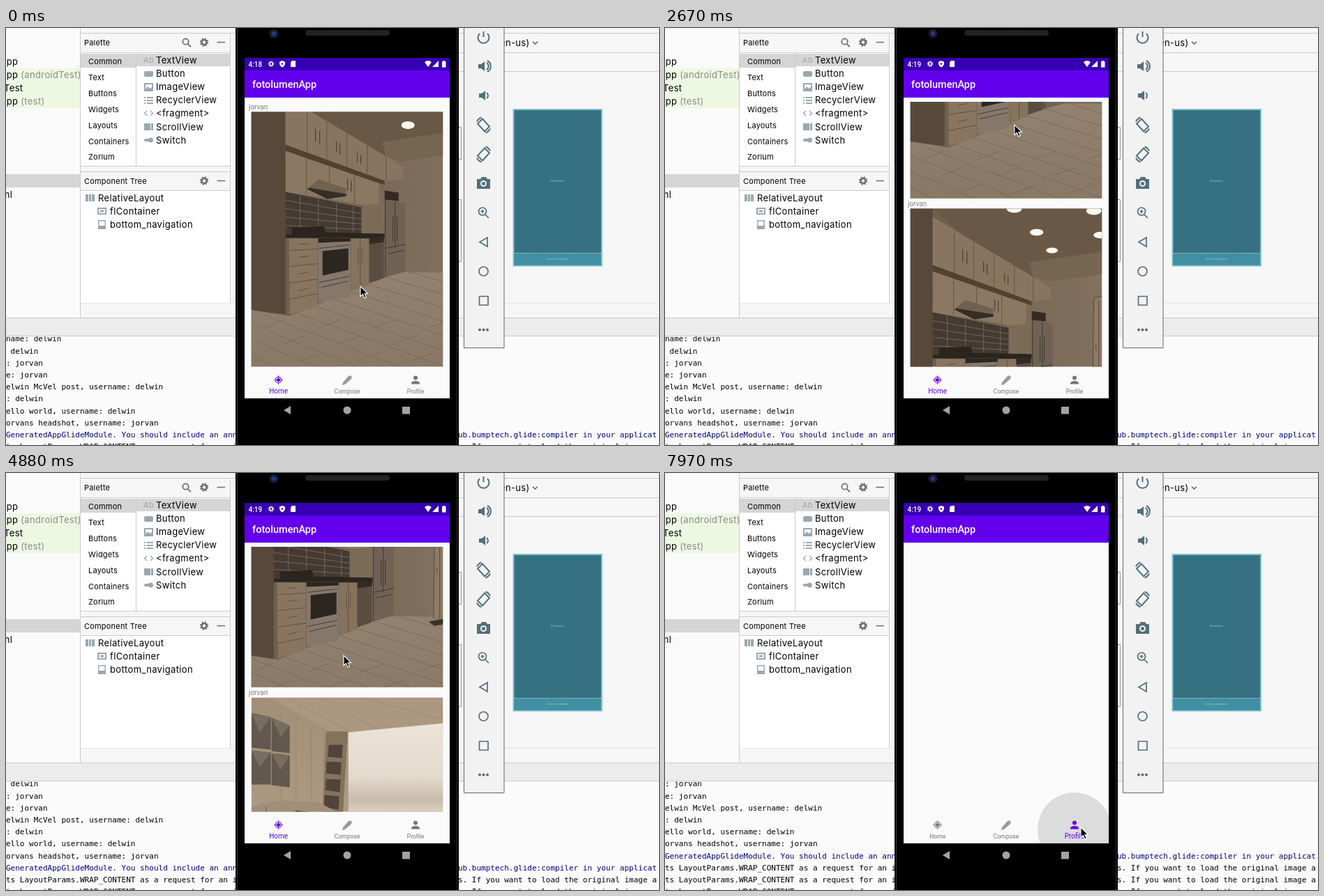
An HTML page for the animation above (8 s loop, 936 px wide and 599 px high).

```html
<!DOCTYPE html>
<html lang="en">
<head>
<meta charset="utf-8">
<title>Phone emulator scroll</title>
<style>
html, body { margin: 0; width: 100%; height: 100%; overflow: hidden; background: #f6f6f6 }
svg { display: block; width: 100vw; height: 100vh }
text { font: 13px Inter, sans-serif; letter-spacing: .35px; white-space: pre }
.small { font-size: 11px; letter-spacing: .2px }
.log { font: 11px "DejaVu Sans Mono", monospace; letter-spacing: 0 }
.tiny { font-size: 3.6px; letter-spacing: 0; fill: #a5cbd5; text-anchor: middle }
#phone text { font-family: Roboto, sans-serif; letter-spacing: 0 }
.name { font-size: 10px; fill: #808080 }
.tab { fill: #757575; color: #757575 }
.tab.on { fill: #6200ee; color: #6200ee }
.tab text { font-size: 8.6px; text-anchor: middle }
.tab.on text { font-size: 10px }
.line { fill: none; stroke: currentColor }
</style>
</head>
<body>
<svg viewBox="0 0 936 599" preserveAspectRatio="none">
<defs>
  <clipPath id="photoClip"><path d="M0 0h274.500v366H0z"/></clipPath>
  <clipPath id="listClip"><path d="M342 106h294v380.500H342z"/></clipPath>
  <clipPath id="screenClip"><path d="M342 43h294v489H342z"/></clipPath>
  <clipPath id="logClip"><path d="M0 443h936v156H0z"/></clipPath>
  <linearGradient id="sky" x2="0" y2="1">
    <stop stop-color="#ebe3d8"/><stop offset=".5" stop-color="#e4dacd"/>
    <stop offset=".72" stop-color="#c9bcad"/><stop offset=".82" stop-color="#d8cdbf"/><stop offset="1" stop-color="#b3a595"/>
  </linearGradient>
  <linearGradient id="wall"><stop stop-color="#6a5a48"/><stop offset="1" stop-color="#857461"/></linearGradient>
  <linearGradient id="floor" x2="0" y2="1"><stop stop-color="#938270"/><stop offset="1" stop-color="#857461"/></linearGradient>
  <linearGradient id="plaster" x2="0" y2="1"><stop stop-color="#a38f78"/><stop offset="1" stop-color="#b8a58d"/></linearGradient>
  <linearGradient id="sofa" x2="0" y2="1"><stop stop-color="#948270"/><stop offset="1" stop-color="#69594a"/></linearGradient>

  <g id="kitchen">
    <path fill="url(#wall)" d="M-20-60H330V420H-20z"/>
    <path fill="#695845" d="M20-60H330V25L188 44 193 64 86 0z"/>
    <path fill="#766551" d="M188 43 330 22V55L215 71 193 64z"/>
    <path fill="url(#floor)" d="M0 285 55 293 193 236 220 230 330 232V420H-20V284z"/>
    <g id="planks" class="line" color="#746351" stroke-width=".7"/>
    <path fill="#58483a" d="M-20-60H49V291L0 284-20 280z"/>
    <path fill="#87755f" d="M49-22 193 64 218 80V95L191 101 49 49z"/>
    <path fill="#51422f" d="M49 47 191 99V105L49 57z"/>
    <path fill="#8a7862" d="M49 56 183 103V137L49 115z"/>
    <path fill="#443a31" d="M49 115 158 137V175L49 176z"/>
    <path fill="#7b6a56" d="M158 135 191 130V177H158z"/>
    <path class="line" color="#87796a" stroke-width=".7" d="M49 127 158 146M49 139 158 154M49 151 158 161M49 163 158 169M70 120V173M96 126V173M122 131V173M146 136V173"/>
    <path class="line" color="#5c4d3b" stroke-width=".8" d="M80-3V59M108 13V69M137 30V80M166 47V91M193 64V101M79 67V119M112 78V125M148 91V131"/>
    <path class="line" color="#3f342a" d="M92 24V43M98 27V46M122 42V58M127 45V61M152 59V72M157 62V75M138 96V113M143 98V115"/>
    <path fill="#70624f" d="M80 111 96 97 136 110V121L109 125z"/>
    <path fill="#352d26" d="M80 111 83 109 136 118V121L109 125z"/>
    <path fill="#2b251f" d="M58 166 104 164 106 173 191 175V182L49 181V176H58z"/>
    <path fill="#887560" d="M54 182H95V279L55 291z"/>
    <path class="line" color="#5a4b3b" stroke-width=".9" d="M55 199 95 197M55 222 95 218M55 246 95 240M55 269 95 261M68 190 82 189M68 209 82 207M68 233 82 230M68 257 82 253"/>
    <path fill="#85786a" d="M96 181H142V265L96 274z"/>
    <path fill="#2c2621" d="M96 181H142V186L96 188zM102 200 139 196V227L102 235z"/>
    <path class="line" color="#463c32" d="M97 196 141 191M97 245 141 236M100 252 139 243"/>
    <path fill="#85735d" d="M143 182H168V249L143 258z"/>
    <path class="line" color="#5a4b3b" stroke-width=".8" d="M156 182V253M153 197V220M159 196V219"/>
    <path fill="#594d41" d="M169 182 190 180V239L169 246z"/>
    <path fill="#342a22" d="M169 182 190 180V187L169 190zM191 113 211 116V128L191 126z"/>
    <path fill="#6f6254" d="M191 126 221 131V229L191 238z"/>
    <path class="line" color="#40362d" d="M206 128V196M192 196 221 190M192 126V238M203 150V186M209 150V186M196 204 218 199"/>
  </g>
  <g id="photo0" clip-path="url(#photoClip)">
    <use href="#kitchen"/>
    <ellipse cx="224.500" cy="19" rx="9.500" ry="5.500" fill="#fffaf0"/>
  </g>
  <g id="photo1" clip-path="url(#photoClip)">
    <use href="#kitchen" x="-17" y="34"/>
    <path fill="#8c7b66" d="M263 128 275 126V273L261 268z"/>
    <path class="line" color="#5a4936" d="M261 268 263 128 275 126M270 132V268M266 195V203"/>
    <path fill="#393027" d="M254 272 275 268V276L262 278z"/>
    <g id="lamps" fill="#fffaf0"/>
  </g>
  <g id="photo2" clip-path="url(#photoClip)">
    <path fill="url(#plaster)" d="M0 0H275V366H0z"/>
    <path fill="#ac9880" d="M25 0H275V38L137 50 110 46z"/>
    <path class="line" color="#927f69" stroke-width=".6" d="M50 0 137 46M100 0 180 45M160 0 275 32M42 25V145M64 26V148M86 39V150M104 47V155"/>
    <path fill="url(#sky)" d="M139 50 275 37V189L139 176z"/>
    <path fill="#ded3c2" d="M139 173 275 185V196L139 182z"/>
    <path fill="#85725c" d="M107 49H138L131 172 102 166z"/>
    <path fill="#51443a" d="M111 68H131L130 87 109 85zM108 92 129 93 128 111 107 109zM107 117 128 118 127 136 106 133zM105 140 126 142 125 161 104 158z"/>
    <path fill="#bfae98" d="M150 197 275 203V366H50V290z"/>
    <path class="line" color="#99876f" stroke-width=".8" d="M155 212 275 219M145 239 182 231M110 270 166 253M95 299 155 279M76 329 137 311M195 200 178 229M230 202 218 232M154 238 65 365M175 221 102 365"/>
    <path fill="#5c4c3f" d="M181 228 275 238V366H115z"/>
    <path class="line" color="#8c7964" stroke-width="4" opacity=".5" d="M175 246 275 256M164 266 275 277M151 290 275 305M137 320 250 335"/>
    <path fill="#62584d" d="M0 22 28 28V75L0 72zM29 29 55 40V80L29 77zM0 76 28 79V125H0zM29 80 55 83V129L29 126z"/>
    <path fill="#776d60" d="M0 22 28 28 12 50zM29 29 55 40 42 57zM0 76 28 79 12 100zM29 80 55 83 42 104z"/>
    <path fill="#a18e79" d="M0 158 18 152 42 148 95 150 130 168 155 178V200H0z"/>
    <path fill="#a59380" d="M0 222 80 190 130 186 155 178V200L50 268 0 262z"/>
    <path fill="url(#sofa)" d="M0 258 50 268 155 197V230L53 310V366H0z"/>
    <path class="line" color="#6b5a49" d="M0 258 50 268 155 197M0 282 48 292 155 214M21 157V187M0 222 80 190"/>
    <path fill="#5b493a" d="M63 162 96 166 92 195 64 188z"/>
    <path fill="#403935" d="M98 166 127 168 125 193 98 192z"/>
    <path fill="#806f5c" d="M26 188 69 178 78 193 38 206zM0 186 28 181 36 208 0 229z"/>
  </g>

  <g id="gear" class="line" color="#6e6e6e">
    <circle r="3.500" stroke-width="2.600"/><circle r="5.300" stroke-width="1.800" stroke-dasharray="2.100 2.060"/>
  </g>
  <path id="speaker" d="M-8-3H-4L1-7V7L-4 3H-8z"/>
  <path id="turn" class="line" stroke-width="1.900" d="M-8.500-2-1.500-9 8.500 2 1.500 9zM-9.500-5A11 11 0 0 1-3-11M9.500 5A11 11 0 0 1 3 11"/>
</defs>

<!-- IDE window -->
<path fill="#f6f6f6" d="M0 0H936V599H0z"/>
<path fill="#fafafa" d="M0 0H106V416H0z"/>
<path fill="#edf8e3" d="M0 58H106V115H0z"/>
<path fill="#d5d5d5" d="M0 210H106V229H0z"/>
<path fill="#fff" d="M107 36H321V198H107zM107 234H321V395H107z"/>
<path fill="#d5d5d5" d="M107 37H186V57H107zM187 37H321V55H187z"/>
<path fill="#ececec" d="M0 417H936V443H0z"/>
<path fill="#fbfbfb" d="M0 443H936V599H0z"/>
<path class="line" color="#cbcbcb" d="M106.500 0V416M107 7.500H330M649 7.500H936M107 35.500H321M649 35.500H936M649 62.500H936M186.500 36V198M321.500 7V395M107 198.500H321M107 206.500H321M107 233.500H321M0 416.500H936M0 442.500H936"/>
<path class="line" color="#e6e6e6" d="M107 395.500H330M714 395.500H936"/>
<g id="ide" fill="#000"></g>
<g class="line" color="#6e6e6e" stroke-width="1.700">
  <circle cx="257.500" cy="19.500" r="4.200"/><path d="M260.500 23 265 27M302.500 20.500H314M302.500 219.500H314M755 19.500 758.500 23 762 19.500"/>
</g>
<use href="#gear" x="284" y="20.500"/><use href="#gear" x="284" y="219.500"/>
<g fill="#9aa7b0">
  <rect x="198" y="62" width="13" height="8" rx="2"/>
  <path fill-rule="evenodd" d="M198 79H211V91H198zM200 81V88L203 84 206 87 208 85 209 87V81z"/>
  <path d="M198 99H200V101H198zM202 99H211V101H202zM198 103H200V105H198zM202 103H211V105H202zM198 107H200V109H198zM202 107H211V109H202z"/>
  <path d="M198 137H207V147H198zM208 137H211V147H208z"/>
  <circle cx="207.500" cy="161" r="3.500"/><rect x="198" y="159" width="8" height="4" rx="2"/>
  <path d="M114 239H118V249H114zM119 239H122V249H119zM123 239H127V249H123z"/>
  <path fill-rule="evenodd" d="M131 258H144V268H131zM133 260V266H142V260zM135 261.500H140V264.500H135zM132 276H143V289H132zM133.500 277.500V284H141.500V277.500z"/>
</g>
<path class="line" color="#9aa7b0" stroke-width="1.400" d="M202 119 198.500 122.500 202 126M207 119 210.500 122.500 207 126"/>

<g clip-path="url(#logClip)"><g id="log"></g></g>

<!-- Blueprint preview -->
<path fill="#367182" stroke="#84c4d2" stroke-width="2" d="M727.500 117H854V341.500H727.500z"/>
<path fill="#418fa3" d="M728.500 324H853V340.500H728.500z"/>
<path class="line" color="#9ad0dc" stroke-dasharray="2 1" d="M728 323.500H853"/>
<text class="tiny" x="790.500" y="221">flContainer</text>
<text class="tiny" x="790.500" y="333">bottom_navigation</text>

<!-- Emulator toolbar -->
<path class="line" color="#999" d="M649 142.500H652.500V188.500H649M649 246.500H652.500V335.500H649"/>
<path fill="#f2f2f2" stroke="#666" d="M656.500-1H714V459.500H656.500z"/>
<g fill="#546e7c" color="#546e7c">
  <g class="line" stroke-width="2">
    <path d="M684.500 5V13M679 8A8 8 0 1 0 690 8M689 50A6 6 0 0 1 689 60M690 47A9 9 0 0 1 690 63M689 93A5 5 0 0 1 689 101"/>
    <g stroke-width="1.700"><circle cx="683" cy="263.500" r="5.500"/><path d="M687 268 692 273M680.500 263.500H685.500M683 261V266M690 301V314L679 307.500z"/>
    <circle cx="684.500" cy="349.500" r="6.500"/><path d="M678.500 385.500H691V398H678.500z"/></g>
  </g>
  <use href="#speaker" x="685" y="55"/><use href="#speaker" x="686" y="97"/>
  <use href="#turn" x="684.500" y="139.500"/><use href="#turn" transform="translate(684.500 181.500) scale(-1 1)"/>
  <path d="M675 217H680L682 214H688L690 217H694V231H675z"/><circle cx="684.500" cy="223.500" r="4.500" fill="#f2f2f2"/><circle cx="684.500" cy="223.500" r="2.500"/>
  <circle cx="679" cy="433.500" r="2"/><circle cx="684.500" cy="433.500" r="2"/><circle cx="690" cy="433.500" r="2"/>
</g>

<!-- Phone -->
<g id="phone">
  <path d="M329 0H649V599H329z"/>
  <path class="line" color="#333" d="M331.500 0V599M646.500 0V599"/>
  <circle cx="384" cy="8" r="6.500" fill="#1b1c2c"/><circle cx="384" cy="8" r="3" fill="#29398c"/>
  <rect x="429" y="3" width="121" height="8" rx="4" fill="#202020"/>
  <path class="line" color="#363636" stroke-dasharray="1 2" d="M432 5.500H547M432 8.500H547"/>
  <path fill="#fafafa" d="M342 100H636V532H342z"/>
  <path fill="#3700b3" d="M342 43H636V61H342z"/><path fill="#6200ee" d="M342 61H636V100H342z"/>
  <g fill="#fff" color="#fff">
    <text id="clock" x="347.500" y="55.500" style="font-size:10px;font-weight:500"></text>
    <text x="353" y="86" style="font-size:14.500px;font-weight:500">fotolumenApp</text>
    <g class="line"><circle cx="380" cy="51.500" r="2.300" stroke-width="1.600"/><circle cx="380" cy="51.500" r="4" stroke-dasharray="1.600 1.540"/></g>
    <path d="M396 47 400 48.500V52Q399 55 396 56.500 393 55 392 52V48.500zM410 47H415V56H408V49.500zM600 49Q605 45 610 49L605 56zM620 47V56H611zM625 48H626.500V47H629V48H630.500V56.500H625z"/>
    <circle cx="396" cy="51.500" r="1.300" fill="#3700b3"/>
  </g>
  <g clip-path="url(#listClip)"><g id="list"></g></g>
  <g clip-path="url(#screenClip)"><circle id="ripple" cx="587" cy="512" fill="#dcdcdc"/></g>
  <g id="home" class="tab">
    <g class="line" opacity=".75"><circle cx="390.500" cy="505.500" r="4.300" stroke-width="1.500"/><path d="M390.500 499V512M384 505.500H397"/></g>
    <circle cx="390.500" cy="505.500" r="2.500"/><text x="390.700" y="524.800">Home</text>
  </g>
  <g class="tab"><path fill="#9a9a9a" d="M482 513 483 509 491 500 493.500 499 496 501.500 495 504 486 512z"/><text x="489" y="524.800">Compose</text></g>
  <g id="profile" class="tab"><circle cx="587" cy="502.500" r="3"/><path d="M581 511.500V510Q582 507 587 507T593 510V511.500z"/><text x="587" y="524.800">Profile</text></g>
  <g fill="#a3a3a3"><path d="M408 543V555L398 549z"/><circle cx="489" cy="549" r="5.500"/><path d="M568 544H579V554.500H568z"/></g>
</g>
<path id="cursor" stroke="#fff" stroke-width="1.100" d="M0 0V14.500L3.400 11.500 5.700 16.800 8.300 15.700 6 10.500H10.500z"/>
</svg>

<script>
const $ = id => document.getElementById(id);
const text = (x, y, str, attrs = '') => `<text x="${x}" y="${y}" ${attrs}>${str}</text>`;
const range = (n, f) => Array.from({length: n}, (_, i) => f(i)).join('');
const column = (x, y, pitch, labels, attrs) => labels.map((s, i) => text(x, y + i * pitch, s, attrs)).join('');
const small = 'class="small"';
const muted = s => `<tspan fill="#8b8b8b">${s}</tspan>`;

$('ide').innerHTML =
  column(-7, 52.5, 19.1, ['app', 'app ' + muted('(androidTest)'), ' Test', 'app ' + muted('(test)')]) +
  text(-6, 244, 'ml') + text(708, 26, 'en-us)') +
  text(112, 25, 'Palette', small) + text(112, 223.5, 'Component Tree', small) +
  column(118, 52, 22.9, ['Common', 'Text', 'Buttons', 'Widgets', 'Layouts', 'Containers', 'Zorlum'], small) +
  column(215, 51, 19.1, ['TextView', 'Button', 'ImageView', 'RecyclerView', '&lt;fragment&gt;', 'ScrollView', 'Switch']) +
  text(197, 50, 'Ab', 'fill="#9aa7b0" style="font-size:11px"') +
  text(132, 248.5, 'RelativeLayout') + column(149, 267.5, 19, ['flContainer', 'bottom_navigation']);

const pitch = 17.2;
const sizeHint = ['ts LayoutParams.WRAP_CONTENT as a request for an image', 's. If you want to load the original image a'];
$('log').innerHTML = [
  ['name: delwin'], [' delwin'], [': jorvan'], ['e: jorvan'],
  ['elwin McVel post, username: delwin'], [': delwin'],
  ['ello world, username: delwin'], ['orvans headshot, username: jorvan'],
  ['GeneratedAppGlideModule. You should include an annotation', 'ub.bumptech.glide:compiler in your applicat', '#00007f'],
  sizeHint, sizeHint, sizeHint
].map(([left, right = '', color = '#000'], i) => {
  const attrs = `class="log" fill="${color}"`, y = 450.4 + i * pitch;
  return text(0, y, left, attrs) + text(648, y, right, attrs);
}).join('');

$('planks').innerHTML = range(11, i =>
  `<path d="M${-70 + i * 29} ${318 - i * 9}L${150 + i * 52} ${420 - i * 6}M${20 + i * 26} ${310 + i % 3 * 24}l${28 + i} -12"/>`);
$('lamps').innerHTML = [[181, 34], [203, 60], [149, 0], [263, 3], [272, 38]].map(([x, y]) =>
  `<ellipse cx="${x}" cy="${y}" rx="${11 - y / 25}" ry="${6 - y / 30}"/>`).join('');
$('list').innerHTML = range(3, i =>
  text(348, 116.5 + i * 381, 'jorvan', 'class="name"') + `<use href="#photo${i}" x="351.700" y="${120.5 + i * 381}"/>`);

// Pointer position and list scroll: [step, x, y, scroll]
const track = [
  [0, 508, 371, 0], [4, 500, 270, 0], [6, 500, 270, 0], [9, 504, 205, 16],
  [14, 501, 146, 232], [15, 501, 146, 232], [18, 501, 139, 242], [20, 500, 120, 285],
  [23, 482, 374, 400], [26, 482, 380, 440], [29, 481, 327, 483], [33, 484, 262, 560],
  [36, 489, 380, 602], [38, 489, 361, 607], [43, 491, 231, 757], [44, 491, 226, 762],
  [47, 609, 488, 762], [51, 596, 509, 762], [99, 596, 509, 762]
];
function poseAt(step) {
  const i = track.findIndex(k => k[0] > step), a = track[i - 1], b = track[i];
  const p = (step - a[0]) / (b[0] - a[0]);
  return a.map((v, j) => v + (b[j] - v) * p);
}

function draw(now) {
  const t = now % 8000;
  const step = Math.max(0, Math.floor((t - 140) / 147.7) + 1);
  const [, x, y, scroll] = poseAt(step);
  const opened = step >= 54;
  const logged = (step >= 20) + (step >= 45);
  $('cursor').setAttribute('transform', `translate(${x} ${y})`);
  $('list').setAttribute('transform', `translate(0 ${-Math.round(scroll)})`);
  $('log').setAttribute('transform', `translate(0 ${-logged * pitch})`);
  $('list').style.display = opened ? 'none' : '';
  $('home').classList.toggle('on', !opened);
  $('profile').classList.toggle('on', opened);
  $('ripple').setAttribute('r', opened ? 53 : step === 53 ? 25 : 0);
  $('clock').textContent = step < 12 ? '4:18' : '4:19';
  requestAnimationFrame(draw);
}
requestAnimationFrame(draw);
</script>
</body>
</html>
```
